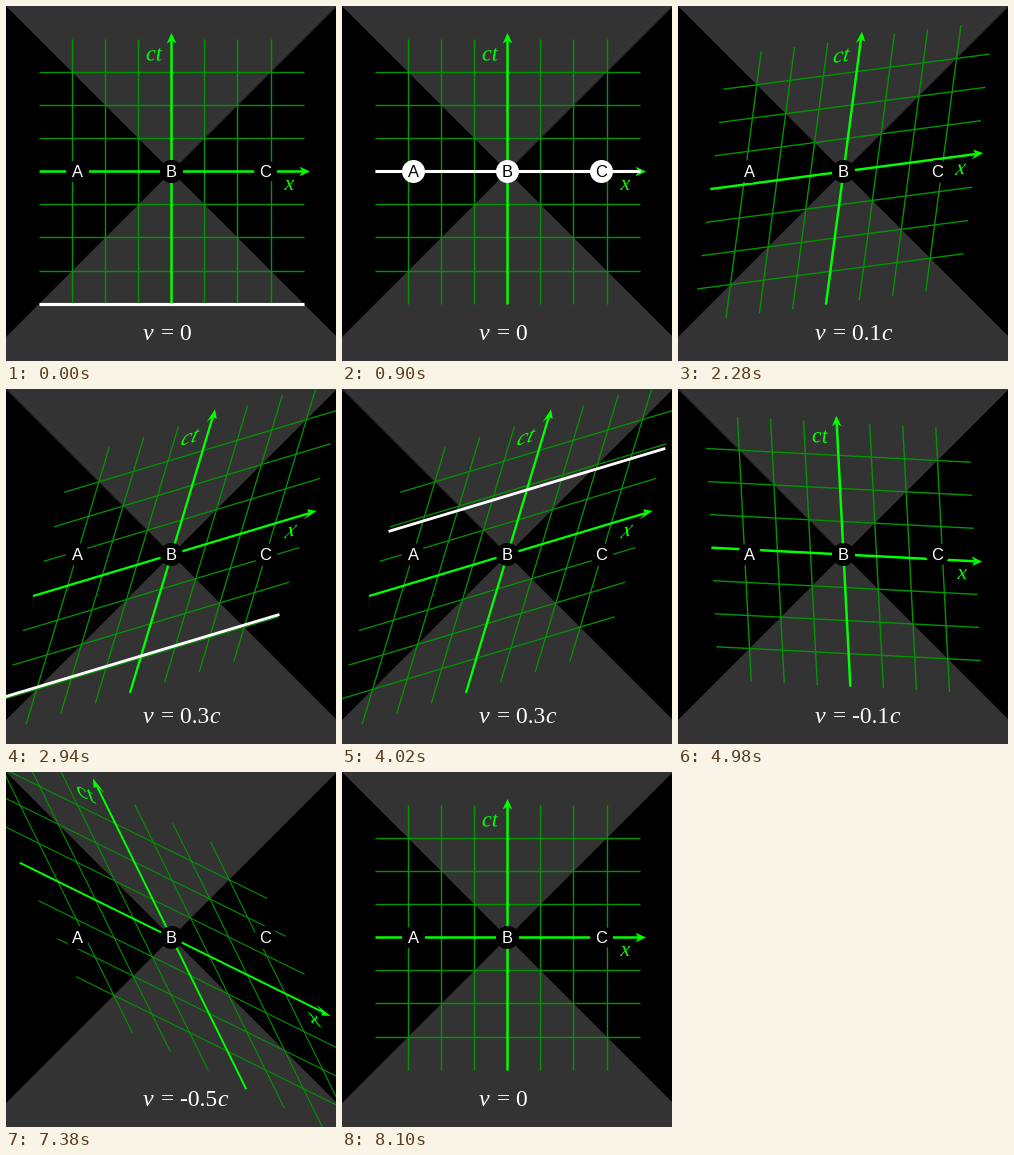
Recreate the animation shown at these times as a matplotlib script. Size 330 by 355 pixels, loop 8160 ms.

```python
import numpy as np
import matplotlib.pyplot as plt
from matplotlib.animation import FuncAnimation
from matplotlib.collections import LineCollection
from matplotlib.patches import Circle, PathPatch, Polygon
from matplotlib.textpath import TextPath
from matplotlib.transforms import Affine2D

W, H, DPI = 330, 355, 72          # at 72 dpi one point is one pixel
CENTER = 165.5                    # origin, in pixels from the top left
FRAMES, STEP = 136, 60
UNIT, HALF = 33, 132
PHASE, SWEEP, EASE = 45, 30, 13   # frames per phase, line sweep, boost
SPEEDS = [0, 0.3, -0.5, 0]
EVENTS = {"A": -94, "B": 0, "C": 94}
RADIUS = 11.5
GREEN, DIM, GRAY = "#00ff00", "#009600", "#333333"
MATH = dict(family="Liberation Serif", style="italic")

fig = plt.figure(figsize=(W / DPI, H / DPI), dpi=DPI, facecolor="black")
ax = fig.add_axes([0, 0, 1, 1])
ax.axis("off")
ax.set(xlim=(-CENTER, W - CENTER), ylim=(CENTER - H, CENTER))
ax.set_autoscale_on(False)

# Light cones
for cone in ([(0, 0), (-170, 170), (170, 170)],
             [(0, 0), (-200, -200), (200, -200)]):
    ax.add_patch(Polygon(cone, color=GRAY, lw=0, zorder=0))

# Everything in the moving frame shares one boost transform
boost = Affine2D()
moving = boost + ax.transData


def lines(segments, color, width, z):
    col = LineCollection(segments, colors=color, linewidths=width,
                         transform=moving, zorder=z)
    ax.add_collection(col, autolim=False)
    return col, width


def swap(points):
    return [(y, x) for x, y in points]


rows = [[(-HALF, k * UNIT), (HALF, k * UNIT)] for k in (-3, -2, -1, 1, 2, 3)]
x_axis = [(-HALF, 0), (131, 0)]
head = [(138.5, 0), (128, 4.8), (131, 0), (128, -4.8)]

strokes = [
    lines(rows + [swap(r) for r in rows], DIM, 1.4, 1),
    lines([x_axis, swap(x_axis)], GREEN, 2.5, 2),
    lines([[(-HALF, 0), (HALF, 0)]], "white", 3.1, 4),
]
now = strokes[-1][0]

for tip in (head, swap(head)):
    ax.add_patch(Polygon(tip, color=GREEN, lw=0, transform=moving, zorder=3))
for pos, name in (((-25.5, 111), "ct"), ((113, -18.5), "x")):
    glyphs = TextPath(pos, name, size=22, prop=MATH)
    ax.add_patch(PathPatch(glyphs, color=GREEN, lw=0,
                           transform=moving, zorder=3))

# Events, fixed in the rest frame
marks = []
for name, x in EVENTS.items():
    disc = ax.add_patch(Circle((x, 0), RADIUS, color="black", lw=0, zorder=5))
    label = ax.text(x - 0.5, -5.3, name, color="white", size=16.5,
                    ha="center", va="baseline", family="Liberation Sans",
                    zorder=6)
    marks.append((x, disc, label))

# Speed readout
BASE = -168
ax.text(-29, BASE, "v", color="white", size=24, va="baseline", **MATH)
value = ax.text(-10, BASE, "= 0", color="white", size=23.5, va="baseline",
                family="Liberation Serif")
unit = ax.annotate("c", (1, BASE), xycoords=(value, "data"), color="white",
                   size=23.5, va="baseline", annotation_clip=False, **MATH)


def state(i):
    """Speed and line time (None while the line is hidden)."""
    phase, k = divmod(i, PHASE)
    if phase >= 3:
        return SPEEDS[3], None
    a, b = SPEEDS[phase], SPEEDS[phase + 1]
    u = np.clip((k - PHASE + EASE) / EASE, 0, 1)
    v = a + (b - a) * (1 - np.cos(np.pi * u)) / 2
    return v, (-HALF + 2 * HALF * k / SWEEP if k <= SWEEP else None)


def draw(i):
    v, t = state(i)
    g = 1 / np.sqrt(1 - v * v)
    boost.set_matrix(np.array([[g, g * v, 0], [g * v, g, 0], [0, 0, 1]]))

    thin = 1 / (g * np.sqrt(1 + v * v))
    for col, width in strokes:
        col.set_linewidth(width * thin)

    now.set_visible(t is not None)
    if t is not None:
        now.set_segments([[(-HALF, t), (HALF, t)]])
    for x, disc, label in marks:
        lit = t is not None and abs(v * x + t / g) < RADIUS
        disc.set_color("white" if lit else "black")
        label.set_color("black" if lit else "white")

    shown = round(float(v), 1)
    value.set_text(f"= {shown:.1f}" if shown else "= 0")
    unit.set_visible(shown != 0)
    return []


anim = FuncAnimation(fig, draw, frames=FRAMES, interval=STEP,
                     init_func=lambda: draw(0), repeat=True, repeat_delay=0)
plt.show()
```
